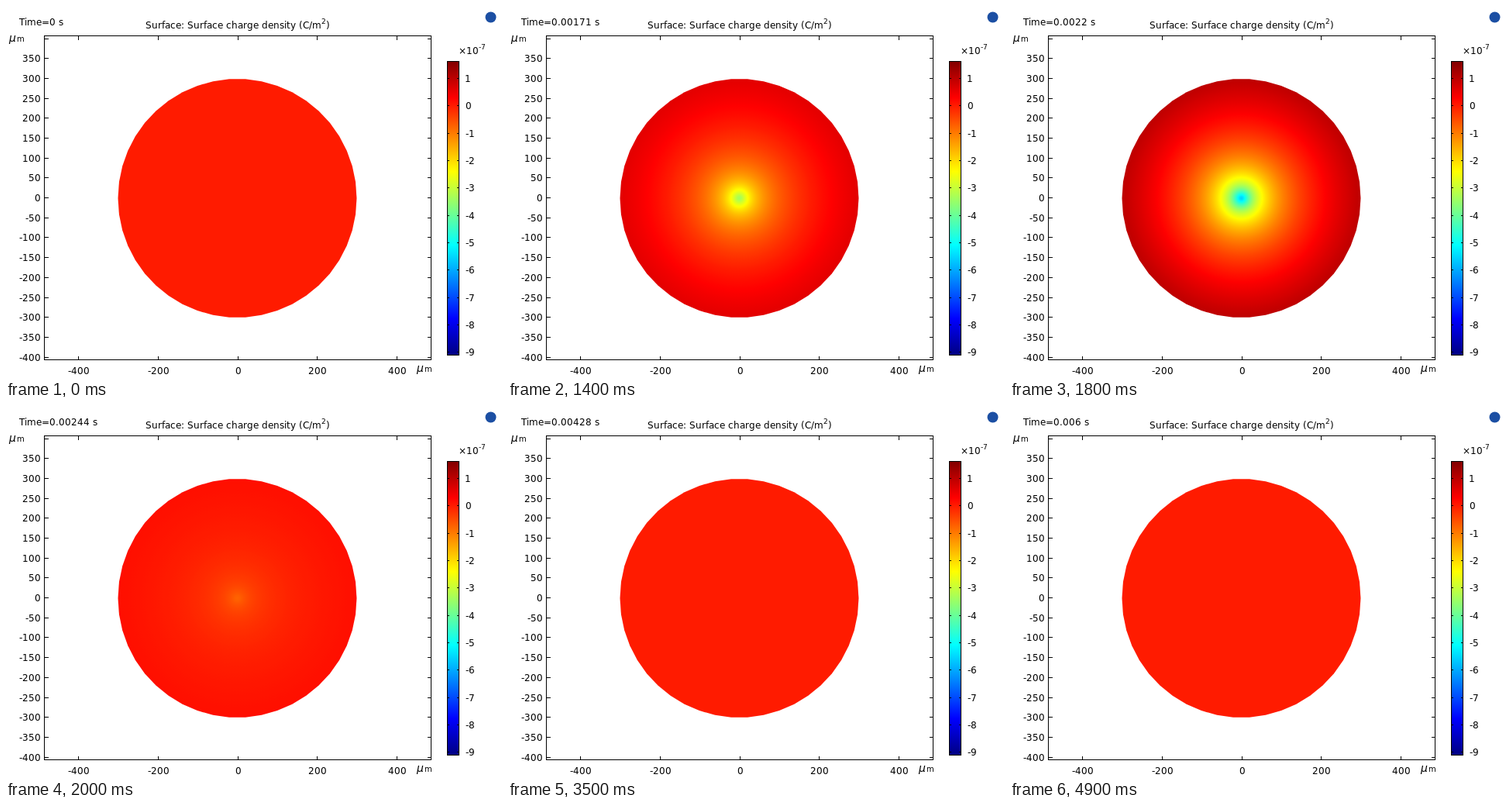
Recreate the animation shown at these times as an HTML page. Size 640 by 480 pixels, loop 5 s.

```html
<!DOCTYPE html>
<html lang="en">
<head>
<meta charset="utf-8">
<title>Surface charge density</title>
<style>
  html, body { margin: 0; width: 100%; height: 100%; overflow: hidden; background: #fff; }
  svg { display: block; width: 640px; height: 480px; }
  text { font-family: "DejaVu Sans", sans-serif; fill: #000; }
  .line { stroke: #000; stroke-width: 1; fill: none; shape-rendering: crispEdges; }
</style>
</head>
<body>
<svg id="stage" viewBox="0 0 640 480"></svg>
<script>
const FRAMES = 50, STEP = 100, T_END = 0.006;
const CX = 298.5, CY = 248, R = 154, SCALE = 0.5137;
const V_MIN = -9.14, V_MAX = 1.63;          // colour range, in 1e-7 C/m²
const T_PEAK = 0.002, SIGMA = 0.0002, CORE = 5.46;
const BOX = { l: 49.5, r: 548.5, t: 38.5, b: 456.5 };
const BAR = { x: 569, y: 71, w: 16, h: 380 };

const svg = document.getElementById('stage');
const pen = document.createElement('canvas').getContext('2d');

function add(name, attrs, parent = svg) {
  const el = document.createElementNS('http://www.w3.org/2000/svg', name);
  for (const key in attrs) el.setAttribute(key, attrs[key]);
  return parent.appendChild(el);
}

// Glyph advances snap to whole pixels, as in hinted text.
function advances(str, size) {
  pen.font = size + 'px "DejaVu Sans", sans-serif';
  return [...str].map(c => Math.round(pen.measureText(c).width));
}

function setText(el, str, x, size, align = 0) {
  const adv = advances(str, size);
  let pos = Math.round(x - align * adv.reduce((a, b) => a + b, 0));
  el.setAttribute('x', adv.map(w => (pos += w) - w).join(' '));
  el.textContent = str;
}

function label(str, x, y, size = 12, align = 0) {
  const el = add('text', { y, 'font-size': size });
  setText(el, str, x, size, align);
  return el;
}

const line = d => add('path', { class: 'line', d });

function rainbow(p) {
  const ch = c => Math.round(255 * Math.max(0, Math.min(1, 1.5 - Math.abs(4 * p - c))));
  return `rgb(${ch(3)},${ch(2)},${ch(1)})`;
}
const colour = v => rainbow((v - V_MIN) / (V_MAX - V_MIN));

// Charge disc
const defs = add('defs', {});
const disc = add('radialGradient',
  { id: 'disc', gradientUnits: 'userSpaceOnUse', cx: CX, cy: CY, r: R }, defs);
const STOPS = 64;
const stops = Array.from({ length: STOPS + 1 }, (_, i) => {
  const u = (i / STOPS) ** 1.7;
  const el = add('stop', { offset: u }, disc);
  return { el, shape: 1.61 + 3.22 * Math.log(Math.hypot(u * R, CORE) / R) };
});
const SIDES = 46;
const points = Array.from({ length: SIDES }, (_, i) => {
  const a = 2 * Math.PI * i / SIDES;
  return (CX + R * Math.cos(a)).toFixed(2) + ',' + (CY + R * Math.sin(a)).toFixed(2);
});
add('polygon', { points: points.join(' '), fill: 'url(#disc)' });

// Axes
line(`M${BOX.l} ${BOX.t}H${BOX.r}V${BOX.b}H${BOX.l}Z`);
for (let v = -400; v <= 400; v += 50) {
  const y = Math.floor(247.6 - v * SCALE);
  line(`M${BOX.l} ${y + 0.5}h5M${BOX.r} ${y + 0.5}h-5`);
  if (v < 400) label(String(v), 45, y + 5, 12, 1);
}
for (let v = -400; v <= 400; v += 200) {
  const x = Math.floor(299 + v * SCALE);
  line(`M${x + 0.5} ${BOX.t}v5M${x + 0.5} ${BOX.b}v-5`);
  label(String(v), x + 0.5, 475, 12, 0.5);
}
for (const [x, y] of [[4, 46], [530, 472]]) {
  label('μ', x, y, 14).setAttribute('font-style', 'italic');
  label('m', x + 10, y, 10);
}

// Colour bar
const scale = add('linearGradient', { id: 'scale', x1: 0, y1: 1, x2: 0, y2: 0 }, defs);
for (let i = 0; i <= 8; i++) add('stop', { offset: i / 8, 'stop-color': rainbow(i / 8) }, scale);
add('rect', { x: BAR.x, y: BAR.y, width: BAR.w, height: BAR.h, fill: 'url(#scale)' });
line(`M${BAR.x + 0.5} ${BAR.y + 0.5}h${BAR.w - 1}v${BAR.h - 1}h${1 - BAR.w}Z`);
for (let v = 1; v >= -9; v--) {
  const y = Math.round(128.3 - v * 35.33);
  line(`M${BAR.x} ${y + 0.5}h3M${BAR.x + BAR.w} ${y + 0.5}h-3`);
  label(String(v), v === 1 ? 592 : 593, y + 5);
}
label('×10', 584, 62);
label('-7', 610, 56, 9);

// Headings
label('Surface: Surface charge density (C/m', 180, 29);
label('2', 407, 23, 9);
label(')', 413, 29);
const clock = label('', 17, 25);
add('circle', { cx: 625.5, cy: 14.5, r: 7, fill: '#1c4fa3' });

// Three digits, cut off rather than rounded
function digits(t) {
  const cut = n => Math.floor(n * 100 + 1e-6) / 100;
  if (t === 0) return '0';
  if (t < 0.001) return cut(t * 1e4) + 'E-4';
  return String(Number((cut(t * 1e3) / 1e3).toFixed(5)));
}

const pulse = t => Math.exp(-((t - T_PEAK) ** 2) / (2 * SIGMA ** 2));
const top1 = pulse(16 * T_END / (FRAMES - 1));

let shown = -1;
function draw(k) {
  if (k === shown) return;
  shown = k;
  const t = k * T_END / (FRAMES - 1);
  const gain = pulse(t) / top1;
  for (const s of stops) s.el.setAttribute('stop-color', colour(gain * s.shape));
  setText(clock, `Time=${digits(t)} s`, 17, 12);
}

const start = performance.now();
function tick() {
  draw(Math.floor((performance.now() - start) / STEP) % FRAMES);
  requestAnimationFrame(tick);
}
tick();
</script>
</body>
</html>
```
